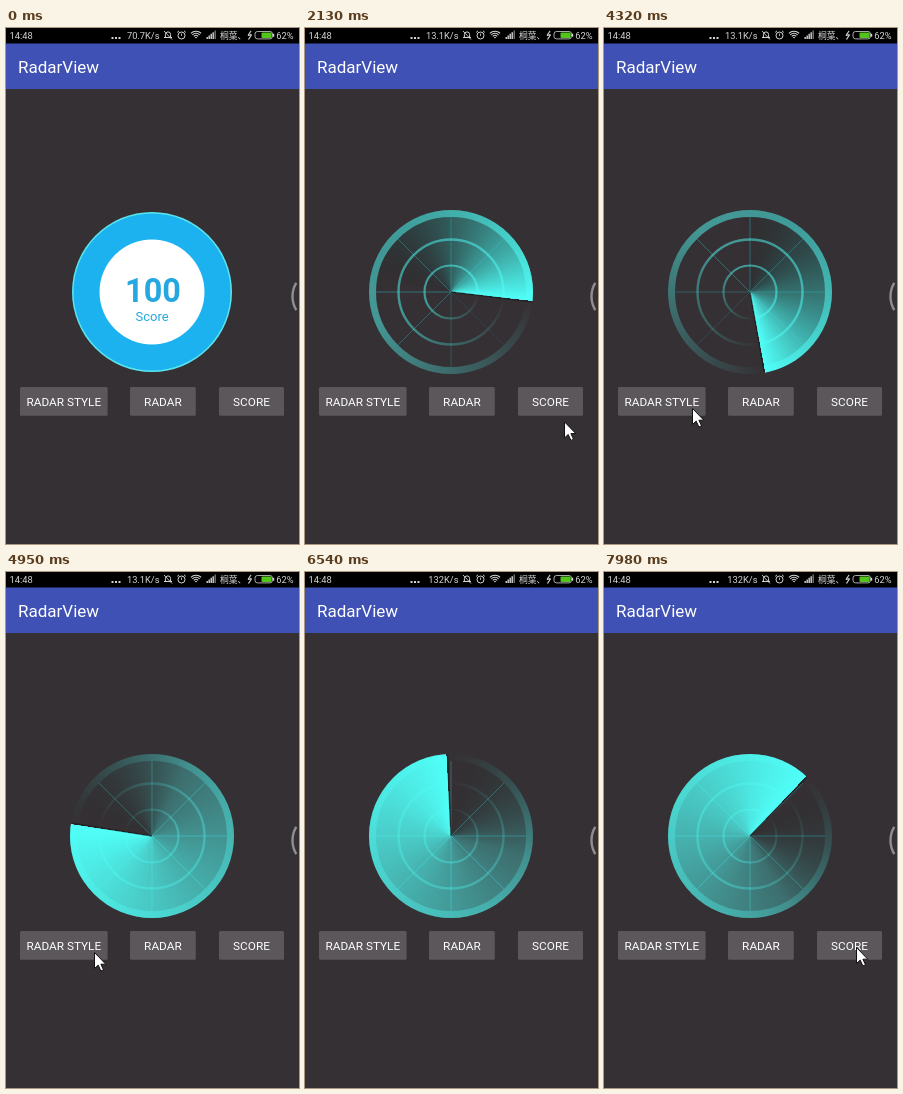
Animation of 293x516 px, one loop 8000 ms. Source, as an HTML page with a canvas:

```html
<!DOCTYPE html>
<html lang="en">
<head>
<meta charset="utf-8">
<title>RadarView</title>
<style>
html, body { margin: 0; width: 100%; height: 100%; overflow: hidden; background: #353033; }
canvas { display: block; width: 293px; height: 516px; }
</style>
</head>
<body>
<canvas id="stage"></canvas>
<script>
const W = 293, H = 516, LOOP = 8000, STEP = 30;
const CX = 146, CY = 264, R = 82, TAU = Math.PI * 2;
const RADAR_ON = 1800, RESTYLED = 4950, RESUMED = 6000;
const INK = '#d4d4d4', CYAN = [80, 255, 248], TEAL = [45, 150, 155];
const canvas = document.getElementById('stage');
const ctx = canvas.getContext('2d');
const scale = window.devicePixelRatio || 1;
canvas.width = W * scale;
canvas.height = H * scale;

function rect(x, y, w, h, color, radius = 0) {
  ctx.fillStyle = color;
  ctx.beginPath();
  ctx.roundRect(x, y, w, h, radius);
  ctx.fill();
}

function disc(x, y, r, color) {
  ctx.fillStyle = color;
  ctx.beginPath();
  ctx.arc(x, y, r, 0, TAU);
  ctx.fill();
}

function arc(x, y, r, width, color, from = 0, to = TAU) {
  ctx.strokeStyle = color;
  ctx.lineWidth = width;
  ctx.beginPath();
  ctx.arc(x, y, r, from, to);
  ctx.stroke();
}

function line(x1, y1, x2, y2, width, color) {
  ctx.strokeStyle = color;
  ctx.lineWidth = width;
  ctx.beginPath();
  ctx.moveTo(x1, y1);
  ctx.lineTo(x2, y2);
  ctx.stroke();
}

function text(str, x, y, size, { color = '#fff', align = 'left', weight = 400 } = {}) {
  ctx.font = `${weight} ${size}px Roboto, "Noto Sans CJK SC", "Noto Sans CJK", sans-serif`;
  ctx.textAlign = align;
  ctx.fillStyle = color;
  ctx.fillText(str, x, y);
}

function drawBell(x, y) {
  arc(x, y, 2.6, 1, INK, Math.PI, TAU);
  line(x - 2.6, y, x - 2.6, y + 3, 1, INK);
  line(x + 2.6, y, x + 2.6, y + 3, 1, INK);
  line(x - 4, y + 3, x + 4, y + 3, 1, INK);
  line(x - 4, y - 3.5, x + 4, y + 5, 0.9, INK);
}

function drawAlarm(x, y) {
  arc(x, y, 3.5, 1, INK);
  line(x, y - 2, x, y + 0.5, 0.8, INK);
  for (const side of [-1, 1]) line(x + side * 4.3, y - 3.1, x + side * 2.5, y - 4.7, 1, INK);
}

function drawBattery(x, y) {
  ctx.strokeStyle = INK;
  ctx.lineWidth = 0.8;
  ctx.beginPath();
  ctx.roundRect(x, y, 17.5, 7.4, 2.5);
  ctx.stroke();
  rect(x + 18, y + 2.2, 1.2, 3, INK);
  rect(x + 6.5, y + 0.9, 10.2, 5.6, '#52c41c', 1);
  line(x - 4, y - 0.5, x - 7, y + 4, 1.2, INK);
  line(x - 7, y + 4, x - 3.5, y + 3.2, 1.2, INK);
  line(x - 3.5, y + 3.2, x - 6.5, y + 8, 1.2, INK);
}

function drawStatusBar(t) {
  const speed = t < RADAR_ON ? '70.7K/s' : t < RESUMED ? '13.1K/s' : '132K/s';
  rect(0, 0, W, 15.4, '#000');
  text('14:48', 3.5, 11, 9.3, { color: INK });
  for (let i = 0; i < 3; i++) rect(105.5 + i * 3.5, 9, 2, 2, INK);
  text(speed, 153.5, 11, 9.3, { color: INK, align: 'right' });
  drawBell(162, 6.5);
  drawAlarm(175.5, 7.5);
  for (let r = 1; r < 8; r += 2.1) arc(190, 10.5, r, 1.1, INK, -2.35, -0.8);
  for (let i = 0; i < 5; i++) rect(200.5 + i * 2, 9 - i * 1.6, 1.4, 2 + i * 1.6, i < 4 ? INK : '#777');
  text('桐葉、', 214, 10.6, 8.8, { color: INK });
  drawBattery(249, 3.5);
  text('62%', 270.3, 11, 9.3, { color: INK });
}

function drawButton(label, x, w) {
  rect(x, 359, w, 28.7, '#5b575a', 1.5);
  text(label, x + w / 2, 377.7, 11.8, { align: 'center' });
}

function drawScore() {
  const color = '#24a8df', align = 'center';
  disc(CX, CY, 80, '#5ae6ee');
  disc(CX, CY, 78.5, '#1cb2ef');
  disc(CX, CY, 52.5, '#fff');
  text('100', CX + 1, 274, 32.4, { color, align, weight: 700 });
  text('Score', CX, 293, 13, { color, align });
}

// Sweep gradient whose opaque end lies on the leading edge.
function sweep(lead, rgb, alphaAt, shadeAt = () => 1) {
  const g = ctx.createConicGradient(lead, CX, CY);
  for (let i = 0; i <= 40; i++) {
    const t = i / 40, shade = shadeAt(t);
    g.addColorStop(t, `rgba(${rgb.map(c => Math.round(c * shade)).join()},${alphaAt(t)})`);
  }
  return g;
}

function spokeLine(angle, r, width, color) {
  line(CX, CY, CX + r * Math.cos(angle), CY + r * Math.sin(angle), width, color);
}

function drawRadar(lead, wide) {
  const span = wide ? 1 : 0.5;
  const local = t => Math.max(0, 1 - (1 - t) / span);
  const fade = t => Math.min(1, t / 0.42);
  const shade = t => wide ? Math.min(1, t / 0.3) : Math.pow(local(t), 0.75);

  const spoke = sweep(lead, TEAL, t => wide ? 0.6 : 0.65 * fade(t));
  for (let i = 0; i < 8; i++) spokeLine(i * TAU / 8, 75, 1, spoke);

  disc(CX, CY, R, sweep(lead, CYAN, local, shade));

  const ring = sweep(lead, CYAN, t => (wide ? 0.32 : 0.5) * fade(t));
  arc(CX, CY, R - 3.5, 7, ring);
  arc(CX, CY, 52.5, 2.4, ring);
  arc(CX, CY, 26.5, 2.2, ring);

  spokeLine(lead + 0.012, R - 1, 1.4, 'rgba(28,28,30,0.7)');
}

function leadDegrees(t) {
  if (t < RESTYLED) return Math.max(0, 6.3 + (t - 2130) / STEP);
  if (t < RESUMED) return 204.4 + (t - 5430) / STEP;
  return 266.8 + (t - 6540) / 31;
}

// The pointer glides in, rests on a button and glides out.
const visits = [
  { from: [289, 96], enter: 720, arrive: 1470, at: [153, 366], leave: 1680, exit: 2370, to: [300, 404] },
  { from: [294, 395], enter: 4050, arrive: 4320, at: [88, 380], leave: 4950, exit: 5370, to: [296, 403] },
  { from: [294, 384], enter: 6840, arrive: 7380, at: [252, 375], leave: LOOP, exit: LOOP, to: [252, 375] }
];

function glide(a, b, t, t0, t1) {
  const u = Math.min(1, Math.max(0, (t - t0) / (t1 - t0 || 1)));
  const k = u * u * (3 - 2 * u);
  return a.map((v, i) => v + (b[i] - v) * k);
}

function drawPointer(t) {
  const v = visits.find(v => t >= v.enter && t <= v.exit);
  if (!v) return;
  const [x, y] = t < v.leave
    ? glide(v.from, v.at, t, v.enter, v.arrive)
    : glide(v.at, v.to, t, v.leave, v.exit);
  const shape = new Path2D('M.5 .5V16.5L4.2 13.1 6.9 19 9.5 17.8 6.9 12.2H11.8Z');
  ctx.save();
  ctx.translate(x, y);
  ctx.fillStyle = '#fff';
  ctx.strokeStyle = '#111';
  ctx.lineWidth = 1;
  ctx.fill(shape);
  ctx.stroke(shape);
  ctx.restore();
}

function draw(t) {
  ctx.setTransform(scale, 0, 0, scale, 0, 0);
  rect(0, 0, W, H, '#353033');
  rect(0, 15, W, 46, '#3f51b5');
  drawStatusBar(t);
  text('RadarView', 12, 45, 17);

  if (t < RADAR_ON) drawScore();
  else drawRadar(leadDegrees(t) * TAU / 360, t >= RESTYLED);

  drawButton('RADAR STYLE', 14, 87.6);
  drawButton('RADAR', 124, 65.8);
  drawButton('SCORE', 213, 65);
  arc(313, 268.5, 26.5, 2.4, '#918e90', Math.PI - 0.54, Math.PI + 0.54);
  drawPointer(t);
}

const start = performance.now();
function tick() {
  const t = (performance.now() - start) % LOOP;
  draw(Math.floor(t / STEP) * STEP);
  requestAnimationFrame(tick);
}
tick();
</script>
</body>
</html>
```
